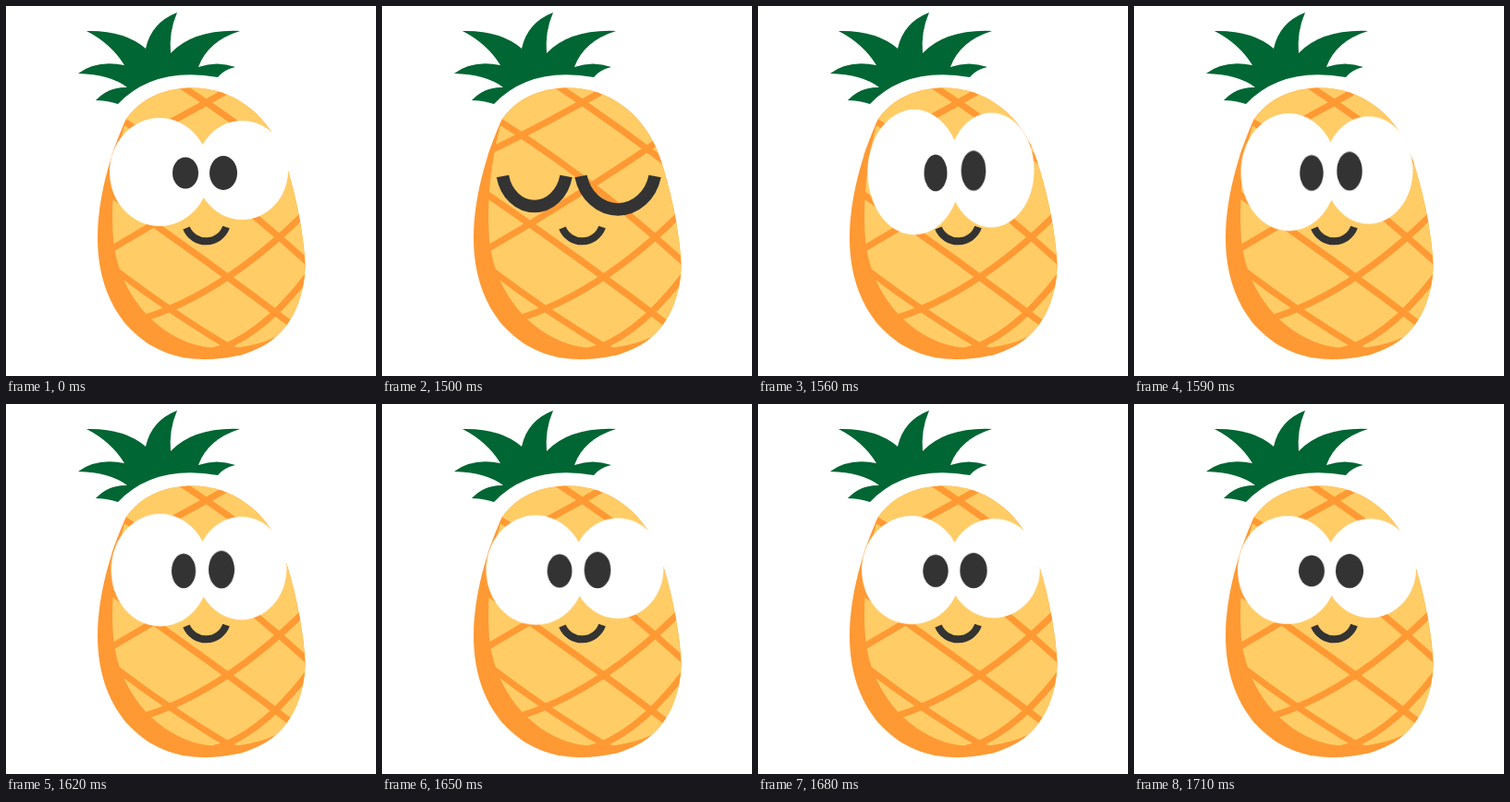
These frames come from a looping animation (400 px wide and 400 px high, 1.8 s). An HTML page:

```html
<!DOCTYPE html>
<html lang="en">
<head>
<meta charset="utf-8">
<title>Blinking pineapple</title>
<style>
  html, body { margin: 0; width: 100%; height: 100%; overflow: hidden; background: #fff; }
  svg { display: block; width: 100vw; height: 100vh; }
  #whites { transform-origin: 208.5px 179px; }
  .pupil { transform-box: fill-box; transform-origin: center; fill: #333; }
  .line { fill: none; stroke: #333; }
</style>
</head>
<body>
<svg viewBox="0 0 400 400">
  <defs>
    <clipPath id="fruit">
      <path id="body" d="M200 88.5C244 88 280 115 297 155C309 185 322 240 323.5 282C322 318 308 345 288 361C268 376 242 382 214 382C155 382 99 338 99 250C99 210 112 160 130 122C146 100 170 89 200 88.5Z"/>
    </clipPath>
  </defs>

  <path fill="#063" d="M97 102Q111 87 131 88Q113 74 78 73Q98 58 128 64Q114 41 87 27Q128 26 151 46Q157 18 185 7Q176 28 178 51Q203 25 253 27Q218 38 208 66Q228 59 248 66Q235 69 229 77Q160 65 121 106Q109 102 97 102Z"/>

  <use href="#body" fill="#f93"/>
  <g clip-path="url(#fruit)">
    <path fill="#fc6" d="M131 119C117 165 113 215 116 252C120 300 150 345 195 363C225 375 275 372 306 349H400V60H131Z"/>
    <path id="stripes" fill="none" stroke="#f93" stroke-width="7"/>
  </g>

  <g id="open">
    <g id="whites" fill="#fff">
      <ellipse cx="166" cy="179.5" rx="54" ry="58.5"/>
      <ellipse cx="255.2" cy="177.5" rx="49.8" ry="53.5"/>
    </g>
    <ellipse id="leftPupil" class="pupil" cx="194" cy="180.5" rx="14" ry="17"/>
    <ellipse id="rightPupil" class="pupil" cx="235" cy="180.5" rx="15" ry="18.5"/>
  </g>
  <g id="closed" class="line" stroke-width="13.5" opacity="0">
    <path d="M130.5 184A35 41 0 0 0 199 184"/>
    <path d="M215 184A41 46 0 0 0 295 184"/>
  </g>
  <path class="line" stroke-width="8" d="M195 240A23 23 0 0 0 238 239"/>
</svg>
<script>
  const LOOP = 1800, SHUT = 1500, WAKE = 1560, STEP = 30, STEPS = 5;
  const start = document.timeline.currentTime ?? performance.now();

  // Each stripe is a parabola across the fruit: height at its left, middle and right.
  const stripe = (left, middle, right) =>
    `M110 ${left}Q219 ${2 * middle - (left + right) / 2} 328 ${right}`;
  const falling = [stripe(37, 106, 186), stripe(114, 188, 279), stripe(201, 278, 359), stripe(279, 355, 415)];
  const rising = [stripe(160, 103, 37), stripe(265, 199, 126), stripe(347, 306, 219), stripe(340, 374, 289)];
  document.getElementById("stripes").setAttribute("d", falling.concat(rising).join(""));

  function play(id, frames) {
    const keys = frames.map(([time, style]) => ({ ...style, offset: time / LOOP, easing: "step-end" }));
    keys.push({ ...keys[keys.length - 1], offset: 1 });
    document.getElementById(id).animate(keys, { duration: LOOP, iterations: Infinity }).startTime = start;
  }

  // After waking, the stretch eases from 1 to 0 in even steps.
  function settle(id, pose) {
    const frames = [[0, { transform: "none" }]];
    for (let i = 0; i <= STEPS; i++) {
      frames.push([WAKE + i * STEP, { transform: pose(1 - i / STEPS) }]);
    }
    play(id, frames);
  }

  const stretch = (x, y) => `scale(${1 - x}, ${1 + y})`;
  const pupil = lift => left =>
    `translate(-2px, ${-lift * left}px) ${stretch(0.11 * left, 0.17 * left)}`;

  settle("whites", left => stretch(0.067 * left ** 2.7, 0.158 * left ** 2.7));
  settle("leftPupil", pupil(0));
  settle("rightPupil", pupil(2.5));

  const blink = (id, rest, shut) =>
    play(id, [[0, { opacity: rest }], [SHUT, { opacity: shut }], [WAKE, { opacity: rest }]]);
  blink("open", 1, 0);
  blink("closed", 0, 1);
</script>
</body>
</html>
```
